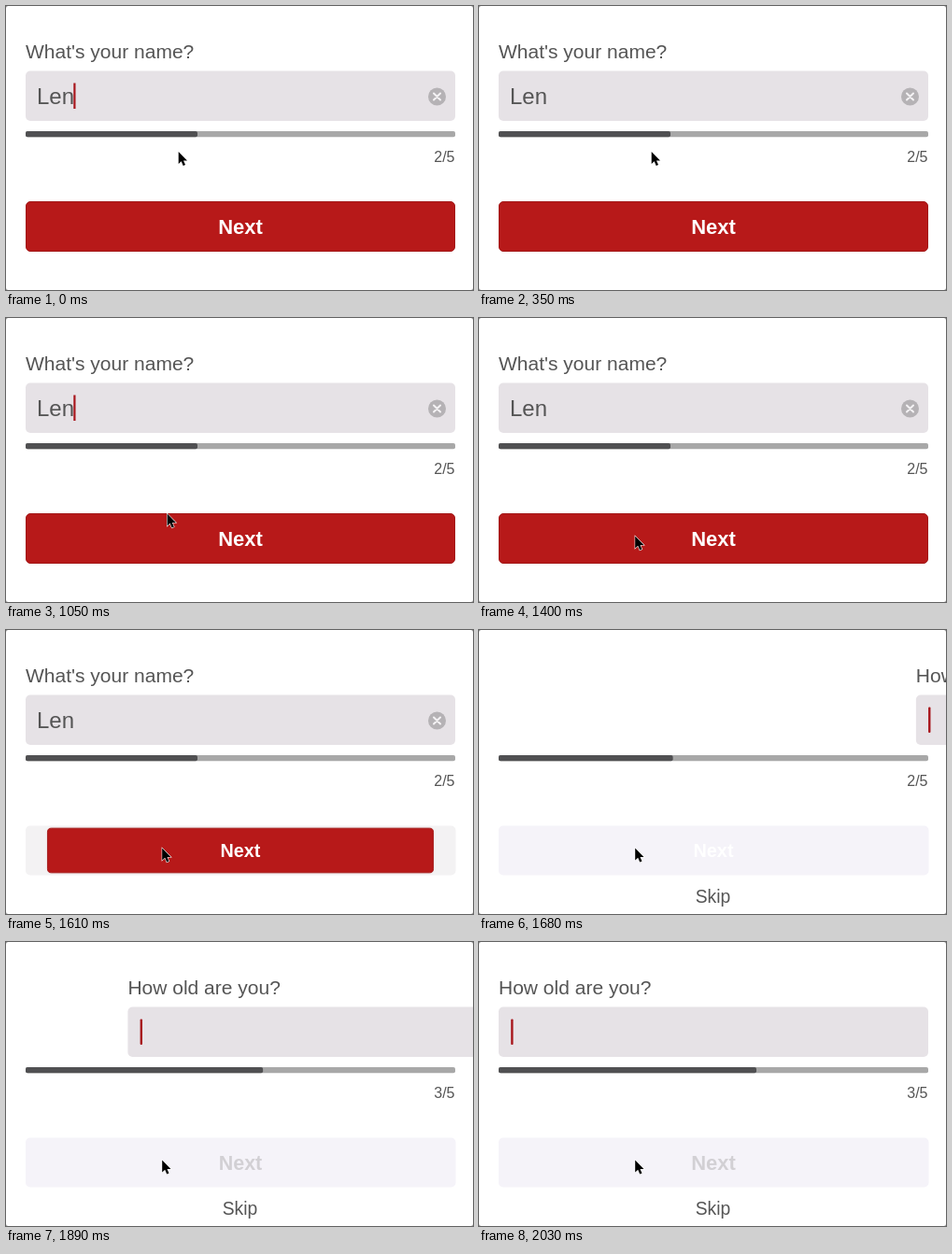
Animation, 500 px wide and 304 px high, one loop 2.1 s. Source, as an HTML page:

```html
<!DOCTYPE html>
<html lang="en">
<head>
<meta charset="utf-8">
<title>Step form</title>
<style>
  html, body { margin: 0; width: 100%; height: 100%; overflow: hidden; background: #8c8c8c; }
  svg { display: block; width: 500px; height: 304px; font-family: "Liberation Sans", Arial, sans-serif; fill: #555; }
  .label { font-size: 21px; }
  .field { fill: #e6e2e6; }
  .caret { fill: #a8161c; }
  .next { font-size: 22px; font-weight: bold; text-anchor: middle; }
</style>
</head>
<body>
<svg viewBox="0 0 500 304">
  <rect width="500" height="304" rx="2.5" fill="#fff"/>

  <g id="nameStep">
    <text class="label" x="21" y="56">What's your name?</text>
    <rect class="field" x="21" y="69.5" width="460" height="53.5" rx="5"/>
    <text x="33" y="105" font-size="24">Len</text>
    <rect id="nameCaret" class="caret" x="72.3" y="82.5" width="2.2" height="27.5"/>
    <circle cx="461.5" cy="97" r="9.5" fill="#b5b2b5"/>
    <path d="M458 93.5l7 7m0-7l-7 7" stroke="#f4f2f4" stroke-width="2" stroke-linecap="round"/>
  </g>

  <g id="ageStep">
    <text class="label" x="21" y="56">How old are you?</text>
    <rect class="field" x="21" y="69.5" width="460" height="53.5" rx="5"/>
    <rect class="caret" x="34.2" y="82.5" width="2.4" height="27.5" rx="1"/>
  </g>

  <rect x="21" y="134" width="460" height="6.2" rx="2" fill="#a8a8a8"/>
  <rect id="bar" x="21" y="134" height="6.2" rx="2" fill="#505052"/>
  <text id="count" x="480.5" y="167" font-size="16" text-anchor="end"></text>

  <rect id="base" x="21" y="209.5" width="460.5" height="53" rx="5"/>
  <g id="button">
    <rect id="red" x="21.5" y="209.5" width="459" height="53" rx="4.5" fill="#b71919" stroke="#a21717"/>
    <text id="next" class="next" x="251" y="244">Next</text>
  </g>
  <text id="skip" x="250.5" y="292" font-size="19.3" text-anchor="middle">Skip</text>

  <path id="cursor" d="M0 0V13L3 10.2 5 15 7.3 14 5.3 9.4H9.3Z" fill="#000" stroke="#fff" stroke-width="1.1" paint-order="stroke"/>
</svg>
<script>
const LOOP = 2100, STEP = 70;
const $ = id => document.getElementById(id);
const clamp = u => Math.max(0, Math.min(1, u));
const ease = u => (1 - Math.cos(Math.PI * clamp(u))) / 2;
const show = (id, on) => $(id).setAttribute("visibility", on ? "inherit" : "hidden");

function draw(ms) {
  let t = Math.floor(ms % LOOP / STEP) * STEP;
  // the picture rests for two steps here
  if ([910, 1540, 1750].includes(t)) t -= STEP;

  const sent = t >= 1680;
  const p = ease((t - 1640) / 370);

  show("nameStep", !sent);
  show("nameCaret", !sent && (t < 140 || (t >= 770 && t < 1400)));
  show("ageStep", sent);
  $("ageStep").setAttribute("transform", `translate(${460 * (1 - p)} 0)`);

  $("bar").setAttribute("width", 184 + 92 * p);
  $("count").textContent = t < 1820 ? "2/5" : "3/5";

  // pressed, then released together with the slide
  const scale = t < 1470 ? 1 : 0.9 + 0.1 * p;
  $("button").setAttribute("transform", `translate(251 236) scale(${scale}) translate(-251 -236)`);
  show("base", t >= 1470);
  $("base").setAttribute("fill", sent ? "#f5f3f9" : "#f3f2f3");
  show("red", !sent);
  $("next").setAttribute("fill", t < 1820 ? "#fff" : "#d2d0d4");
  show("skip", sent);

  const move = t < 840 ? 0 : ease((t - 700) / 560);
  $("cursor").setAttribute("transform", `translate(${184.7 - 17.5 * move} ${156 + 77.5 * move})`);
}

const start = performance.now();
function tick() {
  draw(performance.now() - start);
  requestAnimationFrame(tick);
}
tick();
</script>
</body>
</html>
```
